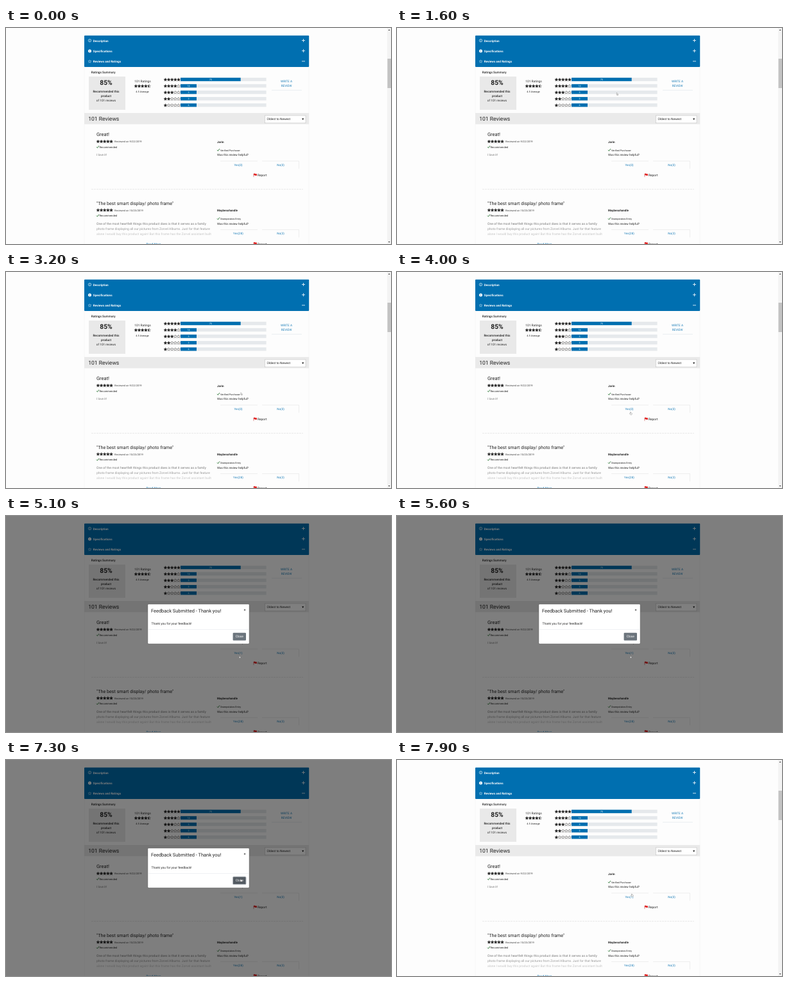
Recreate the animation shown at these times as an HTML page. Size 600 by 338 pixels, loop 8000 ms.

```html
<!DOCTYPE html>
<html lang="en">
<head>
<meta charset="utf-8">
<title>Review feedback</title>
<style>
  html, body { margin: 0; height: 100%; overflow: hidden; background: #fdfdfd; }
  svg { display: block; width: 600px; height: 338px; font-family: Roboto, sans-serif; text-rendering: geometricPrecision; }
</style>
</head>
<body>
<svg id="stage" viewBox="0 0 600 338"></svg>
<script>
const BLUE = '#006fb0', LINK = '#1b7db8', INK = '#222';

const text = (x, y, size, str, { fill = INK, weight = 400, anchor = 'start', id = '' } = {}) =>
  `<text ${id && `id="${id}"`} x="${x}" y="${y}" font-size="${size}" fill="${fill}" font-weight="${weight}" text-anchor="${anchor}">${str}</text>`;
const rect = (x, y, w, h, fill, extra = '') =>
  `<rect x="${x}" y="${y}" width="${w}" height="${h}" fill="${fill}" ${extra}/>`;
const path = (d, extra = '') => `<path d="${d}" ${extra}/>`;

function star(cx, cy, r, fill, stroke = INK) {
  const points = Array.from({ length: 10 }, (_, i) => {
    const a = Math.PI * (i / 5 - .5), d = i % 2 ? r * .45 : r;
    return (cx + d * Math.cos(a)).toFixed(2) + ',' + (cy + d * Math.sin(a)).toFixed(2);
  });
  return `<polygon points="${points.join(' ')}" fill="${fill}" stroke="${stroke}" stroke-width=".4"/>`;
}
const stars = (x, y, score) => [0, 1, 2, 3, 4].map(i =>
  star(x + i * 5.15, y, 2.6, score >= i + 1 ? INK : score > i ? 'url(#half)' : '#fff')).join('');
const check = (x, y) => path(`M${x} ${y}l1.4 1.5l2.5-3.4`, 'fill="none" stroke="#23702c" stroke-width=".9"');

function accordionRow(y, label, open) {
  return text(135.8, y + 1.7, 4.65, label, { fill: '#fff', weight: 700 }) +
    path(`M461 ${y - .5}h5${open ? '' : 'm-2.5-2.5v5'}`, 'stroke="#fff" stroke-width=".8" fill="none"');
}

function header() {
  return rect(122, 11.7, 350.2, 49.3, BLUE, 'rx="1"') +
    accordionRow(20, 'Description') + accordionRow(36.2, 'Specifications') + accordionRow(52.5, 'Reviews and Ratings', true) +
    '<circle cx="130.5" cy="19.6" r="2.2" fill="none" stroke="#fff" stroke-width=".6"/>' +
    path('M130.5 18.2v.6m0 .5v1.6', 'stroke="#fff" stroke-width=".6"') +
    '<circle cx="130.5" cy="36" r="2.5" fill="#fff"/>' +
    path('M129.7 36h1.6', `stroke="${BLUE}" stroke-width=".8"`) +
    star(130.5, 52.4, 2.5, 'none', '#fff');
}

function summary() {
  const mid = { anchor: 'middle' };
  const rows = [75, 14, 3, 3, 6].map((count, i) => {
    const y = 80.5 + i * 10.05, w = i ? 25 : 93.7;
    return stars(248.4, y + .4, 5 - i) + rect(272, y - 2.7, 133.6, 5.4, '#e6e9ec') + rect(272, y - 2.7, w, 5.4, BLUE) +
      text(272 + w / 2, y + 1.3, 3.7, count, { fill: '#fff', anchor: 'middle' });
  }).join('');
  return text(132.8, 71.3, 4.75, 'Ratings Summary', { weight: 500 }) +
    rect(129, 76, 57, 52, '#e9e9e9') +
    text(156, 89.3, 10.3, '85%', { ...mid, weight: 700 }) +
    text(156, 100.5, 4.75, 'Recommended this', { ...mid, weight: 500 }) +
    text(156, 107.9, 4.7, 'product', { ...mid, weight: 500 }) +
    text(156, 115.3, 4.7, 'of 101 reviews', mid) +
    text(213, 85.3, 4.8, '101 Ratings', mid) + stars(202.4, 91, 4.5) +
    text(212.5, 100.6, 3.9, '4.5 Average', mid) + rows +
    text(437, 85, 4.7, 'WRITE A', { ...mid, fill: LINK }) +
    text(437, 92.4, 4.7, 'REVIEW', { ...mid, fill: LINK }) +
    path('M414 97.3h47', 'stroke="#d3dde3" stroke-width=".5"');
}

function toolbar() {
  return rect(122, 133, 350.2, 17.5, '#eaeaea') + text(128.2, 145, 8.6, '101 Reviews') +
    rect(403.5, 137, 63.5, 11.8, '#fff', 'stroke="#bbb" stroke-width=".5"') +
    text(406.6, 144.3, 4.8, 'Oldest to Newest') + path('M461.2 141.5h3l-1.5 2.5z');
}

function review({ y, title, size, date, author, badge, yes, no, yesId }) {
  const vote = { fill: LINK, anchor: 'middle' };
  return text(141, y + 2.4, size, title) +
    stars(143.4, y + 10.7, 5) + text(169, y + 12.4, 4, 'Reviewed on ' + date, { fill: '#444' }) +
    check(141, y + 19.2) + text(145.6, y + 21, 4.1, 'Recommended') +
    text(329, y + 12.7, 4.5, author, { weight: 700 }) +
    check(329, y + 23.9) + text(334, y + 25.7, 3.8, badge) +
    text(329, y + 33.4, 4.6, 'Was this review helpful?') +
    path(`M334 ${y + 41.2}h58m7 0h57.5v12`, 'fill="none" stroke="#dedede" stroke-width=".5"') +
    text(362, y + 48.9, 4.6, `Yes(${yes})`, { ...vote, id: yesId }) + text(428, y + 48.9, 4.6, `No(${no})`, vote) +
    path(`M386 ${y + 66.2}v-5.4`, 'stroke="#b22" stroke-width=".5"') +
    path(`M386.2 ${y + 61}q1.2-.9 2.3 0t2.4 0v2.8q-1.2 .9-2.4 0t-2.3 0z`, 'fill="#e02020"') +
    text(392, y + 65.3, 4.9, 'Report');
}

function reviews() {
  const body = ['One of the most heartfelt things this product does is that it serves as a family',
    'photo frame displaying all our pictures from Zorvel Albums. Just for that feature',
    'alone I would buy this product again! But this frame has the Zorvel assistant built'];
  return review({ y: 167, title: 'Great!', size: 7.5, date: '9/22/2019', author: 'Jorin', badge: 'Verified Purchaser', yes: 0, no: 0, yesId: 'yes' }) +
    text(141, 200, 4.7, 'I love it!', { fill: '#777' }) +
    path('M133 252.3h330', 'stroke="#d0d0d0" stroke-width=".5" stroke-dasharray="3 1"') +
    review({ y: 274.4, title: '"The best smart display/ photo frame"', size: 7.15, date: '10/23/2019', author: 'Maybesohandle', badge: 'Sweepstakes Entry', yes: 28, no: 3 }) +
    body.map((line, i) => text(141, 308.4 + i * 7.6, 5, line, { fill: ['#777', '#999', '#c4c4c4'][i] })).join('') +
    text(230, 339.6, 4.8, 'Read More', { fill: LINK, anchor: 'middle', weight: 500 });
}

const scrollbar = rect(594, 0, 6, 338, '#f3f3f3') + rect(594.5, 48, 5.5, 46, '#c3c3c3') +
  path('M595.6 4h3l-1.5-2zM595.6 334h3l-1.5 2z', 'fill="#555"');

const modal = rect(221, 138, 158, 62, '#fff', 'rx="1.4" stroke="#666" stroke-width=".4"') +
  text(226, 150.7, 7.45, 'Feedback Submitted - Thank you!') +
  text(372, 149, 6, '×', { weight: 700, fill: '#555', anchor: 'middle' }) +
  text(226.6, 170, 4.9, 'Thank you for your feedback!') +
  path('M221 177.6h158', 'stroke="#dee2e6" stroke-width=".5"') +
  rect(353.6, 182.7, 20.4, 12, '#6c757d', 'id="close" rx="1.2"') +
  text(363.8, 190.3, 4.9, 'Close', { fill: '#fff', anchor: 'middle' });

const pointer = 'stroke="#444" stroke-width=".4" fill="#fff" stroke-linejoin="round"';

const $ = id => document.getElementById(id);
$('stage').innerHTML =
  `<defs><linearGradient id="half"><stop offset=".5" stop-color="${INK}"/><stop offset=".5" stop-color="#fff"/></linearGradient></defs>` +
  rect(0, 0, 600, 338, '#fdfdfd') + path('M122.2 61v277M472 61v277', 'stroke="#f1f1f1" stroke-width=".5"') +
  header() + summary() + toolbar() + reviews() +
  `<g id="scrollbar">${scrollbar}</g>` +
  rect(0, 0, 600, 338, '#000', 'id="shade"') + `<g id="modal">${modal}</g>` +
  `<g id="cursor">${path('M0 0V4.6L1.1 3.7L1.9 5.4L2.6 5.1L1.8 3.5H3.3Z', 'id="arrow" ' + pointer)}` +
  path('M0 .3Q.5-.3 1 .3V2L3.4 2.5V4L2.8 5.4H.4L-1.2 3.2L-.8 2.6L0 3.2Z', 'id="hand" ' + pointer) + '</g>';

// Pointer stops: time, x, y
const stops = [[1000, 346, 84], [1200, 341.5, 99.5], [1500, 341.5, 99.5], [2400, 366, 149.5], [3300, 366, 190],
  [4000, 363.5, 219], [5700, 363.5, 219], [6600, 365.5, 186], [7400, 365.5, 186], [7900, 365.5, 209.5]];
const clamp = v => Math.max(0, Math.min(1, v));
const ease = v => v * v * (3 - 2 * v);
const between = (t, a, b) => t >= a && t < b;

function cursorAt(t) {
  const next = stops.findIndex(s => s[0] > t);
  if (next < 0) return stops[stops.length - 1].slice(1);
  const b = stops[next], a = stops[next - 1] || b;
  const k = a === b ? 0 : ease((t - a[0]) / (b[0] - a[0]));
  return [a[1] + (b[1] - a[1]) * k, a[2] + (b[2] - a[2]) * k];
}

function draw(t) {
  const shown = clamp((t - 4900) / 200) * clamp((7500 - t) / 200);
  const hand = between(t, 3800, 5000) || between(t, 6500, 7400) || t >= 7700;
  const hover = between(t, 6500, 7500);
  $('shade').setAttribute('opacity', shown * .5);
  $('modal').setAttribute('opacity', shown);
  $('modal').setAttribute('transform', `translate(0 ${(shown - 1) * 12})`);
  $('scrollbar').setAttribute('opacity', shown > 0 ? 0 : 1);
  $('close').setAttribute('fill', hover ? '#545b62' : '#6c757d');
  $('close').setAttribute('stroke', hover ? '#b5bac0' : 'none');
  $('yes').textContent = t < 4900 ? 'Yes(0)' : 'Yes(1)';
  $('cursor').setAttribute('transform', `translate(${cursorAt(t)}) scale(.8)`);
  $('cursor').setAttribute('opacity', t < 1000 ? 0 : 1);
  $('hand').setAttribute('opacity', hand ? 1 : 0);
  $('arrow').setAttribute('opacity', hand ? 0 : 1);
}

function tick() {
  draw(Math.floor(performance.now() % 8000 / 100) * 100);
  requestAnimationFrame(tick);
}
tick();
</script>
</body>
</html>
```
